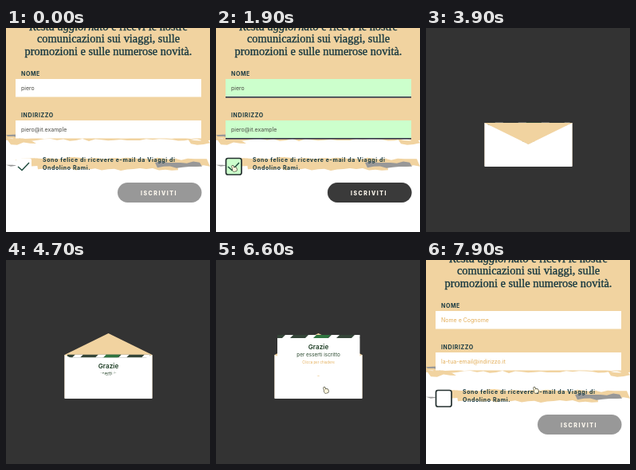
These frames come from a looping animation (256x256 px, 8000 ms). An HTML page with a canvas:

```html
<!DOCTYPE html>
<html lang="it">
<head>
<meta charset="utf-8">
<title>Iscrizione</title>
<style>
  html, body { margin: 0; width: 100%; height: 100%; overflow: hidden; background: #fff; }
  canvas { display: block; width: 256px; height: 256px; }
</style>
</head>
<body>
<canvas id="stage"></canvas>
<script>
const LOOP = 8000;
const SIZE = 256;
const SANS = 'Inter, sans-serif';
const SERIF = '"Liberation Serif", serif';
const SAND = '#f1d3a0', INK = '#183941', MINT = '#ccffcc', DARK = '#333333';
const AMBER = '#e3ad57', GREY = '#989898', WHITE = '#fff';

const canvas = document.getElementById('stage');
const ctx = canvas.getContext('2d');
const scale = window.devicePixelRatio || 1;
canvas.width = canvas.height = SIZE * scale;

const clamp = x => Math.max(0, Math.min(1, x));
const lerp = (a, b, k) => a + (b - a) * k;
const ramp = (t, from, to) => clamp((t - from) / (to - from));
const ease = (t, from, to) => {
  const k = ramp(t, from, to);
  return k * k * (3 - 2 * k);
};
const noise = n => {
  const v = Math.sin(n * 127.1) * 43758.5;
  return v - Math.floor(v);
};

function text(str, x, y, font, color, align = 'left', spacing = 0) {
  ctx.font = font;
  ctx.fillStyle = color;
  ctx.textAlign = align;
  ctx.letterSpacing = spacing + 'px';
  ctx.fillText(str, x, y);
  ctx.letterSpacing = '0px';
}

function rect(x, y, w, h, color) {
  ctx.fillStyle = color;
  ctx.fillRect(x, y, w, h);
}

function pill(x, y, w, h, r, color) {
  ctx.beginPath();
  ctx.roundRect(x, y, w, h, r);
  ctx.fillStyle = color;
  ctx.fill();
}

function triangle(left, right, baseY, tipY, color) {
  ctx.beginPath();
  ctx.moveTo(left, baseY);
  ctx.lineTo(right, baseY);
  ctx.lineTo((left + right) / 2, tipY);
  ctx.fillStyle = color;
  ctx.fill();
}

function withAlpha(alpha, draw) {
  if (alpha <= 0) return;
  ctx.save();
  ctx.globalAlpha *= alpha;
  draw();
  ctx.restore();
}

// Horizontal paint stroke with ragged upper and lower edges.
function brush(left, right, top, bottom, rough, color) {
  const step = 8;
  ctx.beginPath();
  for (let x = left; x <= right; x += step) ctx.lineTo(x, top + rough * noise(x + top));
  for (let x = right; x >= left; x -= step) ctx.lineTo(x, bottom - rough * noise(x + bottom));
  ctx.fillStyle = color;
  ctx.fill();
}

function drawBackdrop() {
  rect(0, 0, SIZE, SIZE, WHITE);
  rect(0, 0, SIZE, 138, SAND);
  brush(0, SIZE, 136, 142, 3, SAND);
  brush(0, 38, 138, 147, 4, SAND);
  brush(228, SIZE, 138, 147, 4, SAND);
  brush(0, 18, 132, 139, 3, GREY);
  brush(38, 216, 162, 179, 3, SAND);
  brush(12, SIZE, 163, 175, 3, SAND);
  brush(187, 246, 167, 176, 3, GREY);
  brush(0, 14, 170, 174, 2, GREY);
}

function drawHeading() {
  const lead = 'Resta aggiornato', rest = ' e ricevi le nostre';
  const roman = `14.4px ${SERIF}`, italic = `italic ${roman}`;
  const mid = SIZE / 2 + 0.5;
  ctx.font = italic;
  const leadWidth = ctx.measureText(lead).width;
  ctx.font = roman;
  const left = mid - (leadWidth + ctx.measureText(rest).width) / 2;

  const line = (str, x, y, font, align) => {
    text(str, x, y, font, INK, align);
    ctx.lineWidth = 0.35;
    ctx.strokeStyle = INK;
    ctx.strokeText(str, x, y);
  };
  line(lead, left, 2.5, italic, 'left');
  line(rest, left + leadWidth, 2.5, roman, 'left');
  line('comunicazioni sui viaggi, sulle', mid, 18, roman, 'center');
  line('promozioni e sulle numerose novità.', mid, 34, roman, 'center');
}

function drawField(y, label, content, color, valid) {
  text(label, 19, y - 4.5, `700 7px ${SANS}`, INK, 'left', 0.6);
  rect(12, y, 233, 22.5, WHITE);
  withAlpha(valid, () => {
    rect(12, y, 233, 22, MINT);
    rect(12, y + 22, 233, 1.6, '#33384a');
  });
  text(content, 19, y + 13.7, `400 7px ${SANS}`, color);
}

function drawCheckbox(t, reset) {
  const border = ease(t, 100, 500);
  const checked = reset ? 0 : ease(t, 1500, 1800);
  pill(12.5, 163.5, 19.5, 20.5, 2.5, checked > 0.5 ? MINT : WHITE);
  withAlpha(border, () => {
    ctx.lineWidth = 1.7;
    ctx.strokeStyle = '#24302f';
    ctx.stroke();
  });
  if (t > 900 && t < 1500) rect(21.5, 173.5, 1, 1, AMBER);
  withAlpha(Math.max(1 - border, checked), () => {
    const size = t < 600 ? 1 : checked;
    ctx.translate(22, 174);
    ctx.scale(size, size);
    ctx.beginPath();
    ctx.moveTo(-7, 0);
    ctx.lineTo(-2, 4.5);
    ctx.lineTo(7, -5);
    ctx.lineWidth = 1.4;
    ctx.strokeStyle = '#1d4a3c';
    ctx.stroke();
  });
}

function drawForm(t) {
  const reset = t > 7600;
  const valid = reset ? 0 : ease(t, 100, 500);
  const color = reset ? AMBER : '#4b4b45';
  const bold = `700 7px ${SANS}`;
  drawBackdrop();
  drawHeading();
  drawField(64, 'NOME', reset ? 'Nome e Cognome' : 'piero', color, valid);
  drawField(116, 'INDIRIZZO', reset ? 'la-tua-email@indirizzo.it' : 'piero@it.example', color, valid);
  drawCheckbox(t, reset);
  text('Sono felice di ricevere e-mail da Viaggi di', 46, 167.5, bold, INK, 'left', 0.6);
  text('Ondolino Rami.', 46, 178, bold, INK, 'left', 0.6);
  pill(140, 194, 105.5, 25, 12.5, GREY);
  if (!reset) withAlpha(ease(t, 1500, 2000), () => pill(140, 194, 105.5, 25, 12.5, '#303030'));
  text('ISCRIVITI', 169, 209.5, `800 7px ${SANS}`, '#fffaf0', 'left', 1.5);
}

function drawLetter(top) {
  const left = 77, width = 103.5, band = 4, period = 29;
  rect(left, top + band - 0.5, width, 47.5, WHITE);
  ctx.save();
  ctx.beginPath();
  ctx.rect(left, top, width, band);
  ctx.clip();
  ctx.transform(1, 0, -1, 1, top, 0);
  rect(left, top, width + band, band, '#344538');
  rect(left + 48, top, period - 10, band, '#2f7440');
  for (let x = left + 10; x < left + width; x += period) rect(x, top, 10, band, WHITE);
  ctx.restore();
  text('Grazie', 128.5, top + 18, `600 8.2px ${SANS}`, '#1d3d24', 'center');
  text('per esserti iscritto', 128.5, top + 27, `400 6.4px ${SANS}`, '#2c4a30', 'center');
  text('Clicca per chiudere', 128.5, top + 36.5, `400 4.4px ${SANS}`, AMBER, 'center');
}

function drawEnvelope(t) {
  const left = 73.5, right = 183.5, top = 119, bottom = 174, depth = 27;
  const opening = ease(t, 4200, 4700) - ease(t, 7000, 7500);
  const lift = ease(t, 4700, 5300) - ease(t, 6400, 6880);
  const tip = top + depth * Math.cos(Math.PI * opening);
  const flap = () => triangle(left, right, top, tip, SAND);

  rect(left, top, right - left, bottom - top - 1, SAND);
  if (tip < top) flap();
  drawLetter(lerp(118.5, 79, lift));
  ctx.beginPath();
  ctx.moveTo(left, top);
  ctx.lineTo((left + right) / 2, top + depth);
  ctx.lineTo(right, top);
  ctx.lineTo(right, bottom);
  ctx.lineTo(left, bottom);
  ctx.fillStyle = WHITE;
  ctx.fill();
  if (tip >= top) flap();
}

// Dark sheet that grows out of the button and carries the envelope.
function drawThanks(t) {
  const k = ease(t, 3300, 3700);
  withAlpha(1 - ease(t, 7600, 7850), () => {
    pill(lerp(140, 0, k), lerp(194, 0, k), lerp(105.5, SIZE, k), lerp(25, SIZE, k), lerp(12.5, 0, k), DARK);
    withAlpha(ease(t, 3600, 3850), () => drawEnvelope(t));
  });
}

function pointerAt(t) {
  if (t >= 800 && t < 2300) {
    const k = 1 - (1 - ramp(t, 800, 1250)) ** 2;
    return [lerp(126, 23, k), lerp(189, 176, k)];
  }
  if (t >= 2300 && t < 3400)
    return [lerp(23, 186, ramp(t, 2300, 3300) ** 2.7), lerp(176, 213, ramp(t, 2300, 2900))];
  if (t >= 6200) {
    const k = ease(t, 6200, 6500);
    return [lerp(150, 138, k), lerp(192, 163, k)];
  }
  return null;
}

function drawPointer(t) {
  const at = pointerAt(t);
  if (!at) return;
  ctx.save();
  ctx.translate(...at);
  ctx.rotate(-0.2);
  ctx.beginPath();
  ctx.roundRect(-2.4, -3.6, 1.8, 5, 0.9);
  ctx.roundRect(-2.4, -0.8, 5, 4.6, 1.5);
  ctx.lineWidth = 1.4;
  ctx.strokeStyle = '#46473a';
  ctx.stroke();
  ctx.fillStyle = '#fff6dc';
  ctx.fill();
  ctx.restore();
}

function render(t) {
  ctx.setTransform(scale, 0, 0, scale, 0, 0);
  if (t < 3700 || t > 7600) drawForm(t);
  if (t >= 3300 && t < 7850) drawThanks(t);
  drawPointer(t);
}

const start = performance.now();
function tick() {
  render((performance.now() - start) % LOOP);
  requestAnimationFrame(tick);
}
tick();
</script>
</body>
</html>
```
